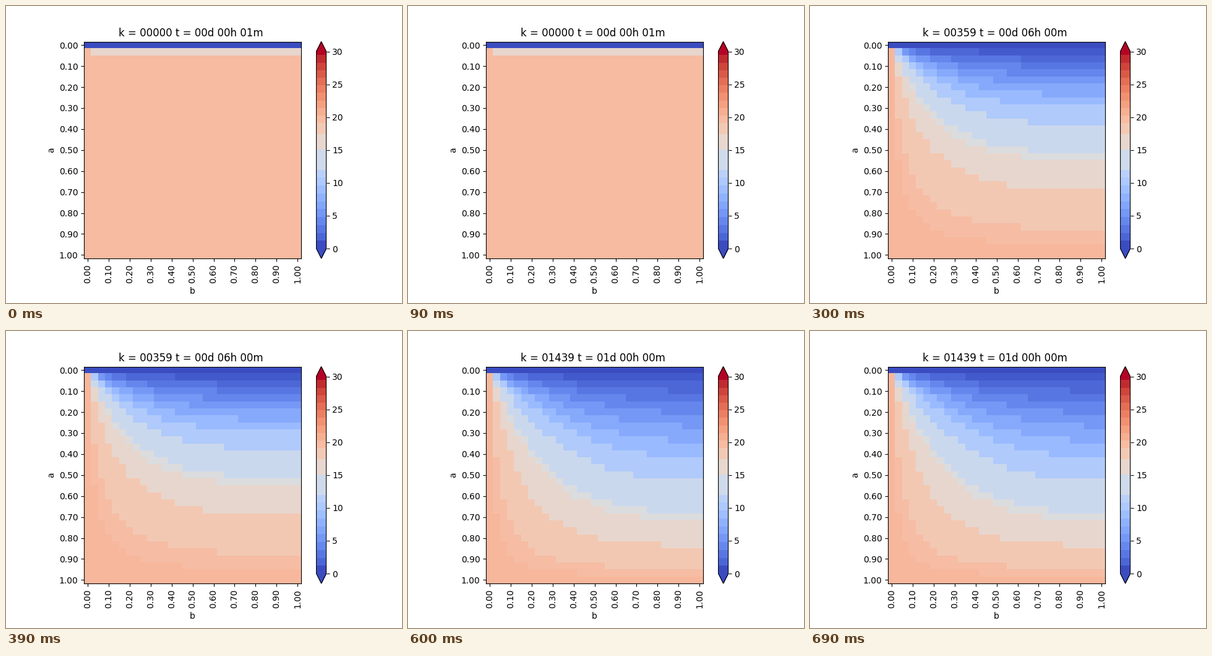
A matplotlib script that plays this animation: 640 by 480 pixels, repeating every 0.75 s.

```python
import matplotlib.pyplot as plt
import numpy as np
from matplotlib.animation import FuncAnimation
from matplotlib.cm import ScalarMappable
from matplotlib.colors import ListedColormap, Normalize

N = 30            # cells per side, minus one
WARM = 20.0       # start value, also held on the left and bottom edges
VMAX = 30.0
R = 0.284         # diffusivity * time step / cell size squared
MINUTES = [1, 120, 360, 720, 1440]

# Band limits: even steps at both ends of the scale, wide pale middle
BAR_EDGES = np.r_[np.linspace(0, 12, 11), 15.07, 17.4,
                  np.linspace(19.1, 30.6, 11)]

# Band limits of the cooled field: widening cold steps, then the warm ones
step = np.arange(8)
FIELD_EDGES = np.r_[0, 0.5 + 0.82 * step + 0.065 * step**2,
                    11.65, 14.55, 15.2, 17.3, 19.1, 19.63, 20.27]


def shade(values, edges):
    """Colour each value with the coolwarm colour of its band's middle."""
    mids = (edges[1:] + edges[:-1]) / 2
    mids[0] = 0
    band = np.digitize(values, edges[1:-1])
    return plt.cm.coolwarm(mids / VMAX)[band]


def second_difference(n):
    return 2 * np.eye(n) - np.eye(n, k=1) - np.eye(n, k=-1)


# Eigenmodes: fixed ends vertically, insulated right edge horizontally
lap_x = second_difference(N)
lap_x[-1, -1] = 1
rate_y, modes_y = np.linalg.eigh(second_difference(N - 1))
rate_x, modes_x = np.linalg.eigh(lap_x)
rates = rate_y[:, None] + rate_x
source = np.zeros((N - 1, N))
source[0] = WARM
steady = modes_y.T @ source @ modes_x / rates


def temperature(minutes):
    """Field after one implicit step per minute, top edge held at zero."""
    cooling = steady * (1 - (1 + R * rates) ** -float(minutes))
    field = np.full((N + 1, N + 1), WARM)
    field[1:N, 1:] -= modes_y @ cooling @ modes_x.T
    field[0] = 0
    return field


def clock(total):
    hours, minutes = divmod(total, 60)
    days, hours = divmod(hours, 24)
    return f"k = {total - 1:05d} t = {days:02d}d {hours:02d}h {minutes:02d}m"


fig, ax = plt.subplots(figsize=(6.4, 4.8), dpi=100)
fig.subplots_adjust(bottom=0.15)

image = ax.imshow(shade(temperature(1), BAR_EDGES), interpolation="nearest")
ticks = np.arange(0, N + 1, 3)
labels = [f"{t / N:.2f}" for t in ticks]
ax.set_xticks(ticks, labels, rotation=90)
ax.set_yticks(ticks, labels)
ax.set_xlabel("b")
ax.set_ylabel("a")
title = ax.set_title(clock(1), x=0.4925)

bar_map = ListedColormap(shade(np.linspace(0, VMAX, 600), BAR_EDGES))
fig.colorbar(ScalarMappable(Normalize(0, VMAX), bar_map), ax=ax,
             extend="both", aspect=22, ticks=np.arange(0, 31, 5))


def draw(i):
    minutes = MINUTES[i]
    edges = FIELD_EDGES if i else BAR_EDGES
    image.set_data(shade(temperature(minutes), edges))
    title.set_text(clock(minutes))
    return image, title


anim = FuncAnimation(fig, draw, frames=len(MINUTES), interval=150, repeat=True)
plt.show()
```
